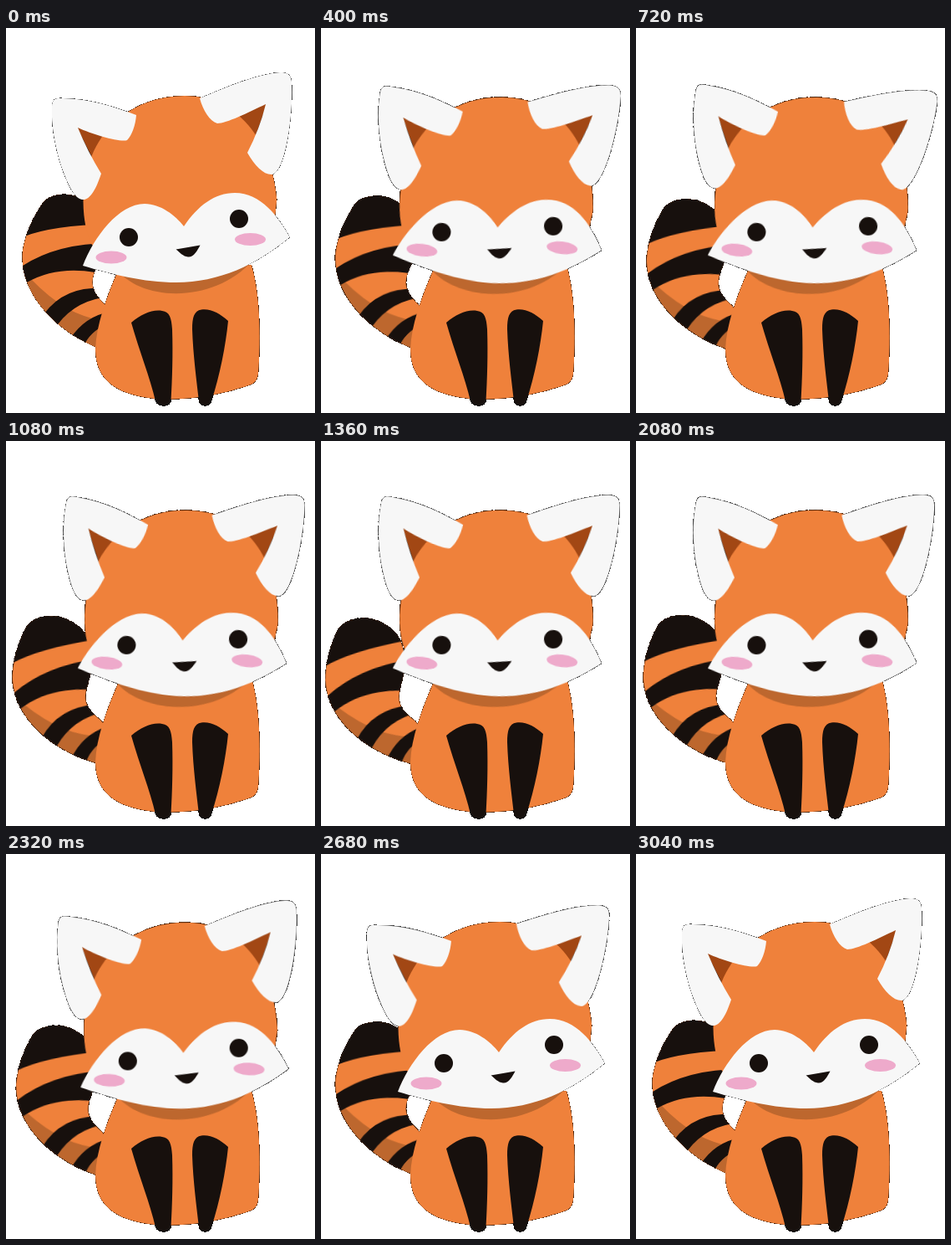
Animation of 370 by 460 pixels, one loop 3080 ms. Source, as an HTML page without scripts:

```html
<!DOCTYPE html>
<html lang="en">
<head>
<meta charset="utf-8">
<title>Red panda</title>
<style>
  html, body { margin: 0; width: 100%; height: 100%; overflow: hidden; background: #fff; }
  svg { display: block; width: 370px; height: 460px; }

  .orange { fill: #ef813b; }
  .shade { fill: #bd672e; }
  .brown { fill: #a24714; }
  .black { fill: #17100d; }
  .white { fill: #f7f7f7; }
  .pink { fill: #eeaacb; }

  .tail, .head, .ear-l, .ear-r {
    animation: 3080ms cubic-bezier(.364, 0, .636, 1) infinite;
  }
  .tail { transform-origin: 139px 367px; animation-name: sway; }
  .head { transform-origin: 200px 224px; animation-name: tilt; }
  .ear-l { transform-origin: 150px 113px; animation-name: perk; }
  .ear-r { transform-origin: 240px 105px; animation-name: flick; }

  @keyframes sway {
    0%, 100% { transform: rotate(0deg); }
    50% { transform: rotate(-9.6deg); }
  }
  @keyframes tilt {
    0%, 1.3% { transform: rotate(0deg); }
    13.6%, 66.1% { transform: rotate(6.46deg); }
    83%, 100% { transform: rotate(0deg); }
  }
  @keyframes perk {
    0%, 15% { transform: rotate(0deg); }
    30%, 80% { transform: rotate(2.2deg); }
    87% { transform: rotate(-.6deg); }
    97%, 100% { transform: rotate(0deg); }
  }
  @keyframes flick {
    0%, 13% { transform: rotate(0deg); }
    19.5%, 20.8% { transform: rotate(5deg); }
    31%, 81.5% { transform: rotate(-2.5deg); }
    87%, 91% { transform: rotate(5.2deg); }
    98%, 100% { transform: rotate(0deg); }
  }
</style>
</head>
<body>
<svg viewBox="0 0 370 460" role="img" aria-label="Red panda wagging its tail">
  <defs>
    <path id="body" d="M134 290C120 322 108 355 107 384C107 422 134 440 185 443.500C225 445 265 436 292 426.500C299 424 301.500 420 302.300 410C305 370 304.500 318 294 283Z"/>
    <path id="tail" d="M110 382C68 366 18.500 324 19.500 272C20 255 30 228 45 208C55 197 80 194 100 210C116 222 122 240 116 265C112 282 104 290 103.500 304C104 315 110 322 118 330L130 350Z"/>
    <clipPath id="in-body"><use href="#body"/></clipPath>
    <clipPath id="in-tail"><use href="#tail"/></clipPath>

    <!-- hard silhouette with a hairline dark rim -->
    <filter id="rim" filterUnits="userSpaceOnUse" x="0" y="0" width="370" height="460" color-interpolation-filters="sRGB">
      <feComponentTransfer in="SourceAlpha" result="mask">
        <feFuncA type="discrete" tableValues="0 1 1 1 1"/>
      </feComponentTransfer>
      <feComposite in="SourceGraphic" in2="mask" operator="in" result="art"/>
      <feMerge><feMergeNode in="mask"/><feMergeNode in="art"/></feMerge>
    </filter>
  </defs>

  <g filter="url(#rim)">
    <g class="tail">
      <use href="#tail" class="orange"/>
      <g clip-path="url(#in-tail)">
        <path class="shade" d="M10 280L29 299Q52 323 75 336Q92 345 115 350L120 400L10 380Z"/>
        <g class="black">
          <path d="M10 255L22 249Q55 236 125 234V180H10Z"/>
          <path d="M10 290L20 284Q62 257 125 257V293L107 292Q60 284 25 304L10 315Z"/>
          <path d="M40 350Q62 313 103 311L125 311V321Q85 324 62 354L56 364Z"/>
          <path d="M77 371Q95 344 125 339V352Q104 360 95 376L92 384Z"/>
        </g>
      </g>
    </g>

    <use href="#body" class="orange"/>
    <g clip-path="url(#in-body)">
      <path class="head shade" d="M130 285C160 329 250 329 295 278L280 250H140Z"/>
    </g>
    <g class="black">
      <path d="M150 352C162 342 175 336 187 338C196 339 198 346 199 360C200 390 199 420 197.500 446C196 453 182 453 179 446C173 419 159 384 150 352Z"/>
      <path d="M266 350C256 341 245 335 234 336.500C225 338 223 346 223 360C224 390 228 420 231 446C233 453 244 453 246 446C256 415 263 380 266 350Z"/>
    </g>

    <g class="head">
      <path class="ear-l brown" d="M84 117L130 132L112 172Z"/>
      <path class="ear-r brown" d="M313 89L268 108L291 151Z"/>
      <path class="orange" d="M92.500 208C92.500 125 150 81 214 81C276 81 318 133 324.300 205L322 228L300 260L110 265L103 259Q93 240 92.500 208Z"/>
      <path class="white" d="M92 284C105 250 135 210 166 210C185 210 203 224 213 237C230 212 250 197 274 197C305 197 326 225 340 250C300 283 255 304 204 304C165 304 125 294 92 284Z"/>
      <g class="pink">
        <ellipse cx="126" cy="274" rx="18.500" ry="7.500"/>
        <ellipse cx="292.500" cy="252.500" rx="18.500" ry="7.500"/>
      </g>
      <g class="black">
        <circle cx="147" cy="250" r="11"/>
        <circle cx="279" cy="228" r="11"/>
        <path d="M203.500 264.500L232.500 259.500C229 266 225 274 218 273.500C212 273 208 268 203.500 264.500Z"/>
      </g>
      <path class="ear-l white" d="M156 104C155 116 151 128 145 134C138 137 105 128 86 119Q98 148 114 174C108 192 101 206 91 205C82 203 75 190 66 165C58 140 54 115 55 94C55 86 58 83 68 84C100 84 130 94 156 104Z"/>
      <path class="ear-r white" d="M232 84C236 99 244 111 253 114C264 114 290 101 311 91Q304 120 289 149C298 165 309 176 319 175C328 173 335 150 339 122C342 100 343 80 342 64C341 55 337 53 328 53C300 55 265 70 232 84Z"/>
    </g>
  </g>
</svg>
</body>
</html>
```
